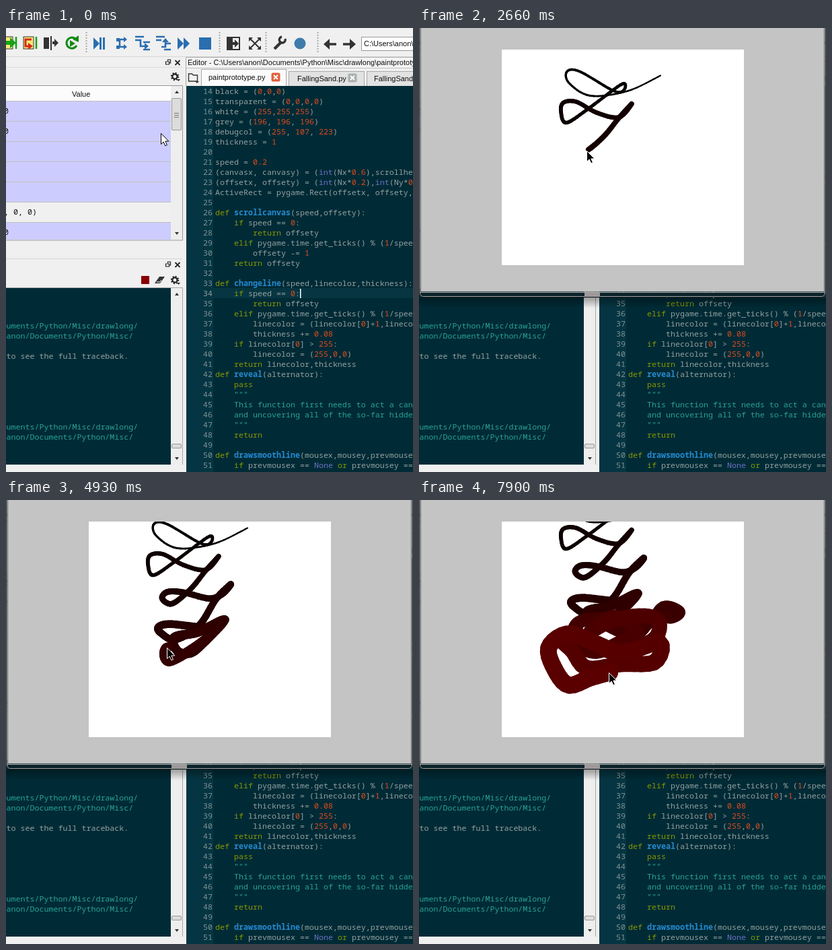
Animation of 605x659 px, one loop 7.99 s. Source, as an HTML page with a canvas:

```html
<!DOCTYPE html>
<html lang="en">
<head>
<meta charset="utf-8">
<title>Scrolling paint prototype</title>
<style>
  html, body { margin: 0; width: 100%; height: 100%; overflow: hidden; background: #f0f0f0; }
  svg, canvas { position: absolute; left: 0; top: 0; display: block; }
  #canvas { left: 123px; top: 32px; }
  text { white-space: pre; font: 11px "Liberation Sans", Arial, sans-serif; fill: #111; }
  .mono { font: 11.667px "Noto Sans Mono", monospace; }
  .plain { fill: #93a1a1; }
  .keyword { fill: #859900; }
  .number { fill: #dc4b20; }
  .builtin { fill: #6c71c4; }
  .doc { fill: #2aa198; }
  .name { fill: #268bd2; font-weight: bold; }
</style>
</head>
<body>
<svg id="scene" width="605" height="659"></svg>
<canvas id="canvas" width="360" height="320"></canvas>
<svg id="pointer" width="605" height="659">
  <path id="arrow" d="M.5 .5V16.5L4.2 13 6.8 18.8 9.4 17.7 6.9 12H11.8Z"/>
</svg>
<script>
const LOOP = 7990;
const OPEN = 330, READY = 530, START = 850;
const SCROLL = 0.013;            // canvas pixels per ms
const FIRST_LINE = 14, ROW = 15, CHAR = 7;

const code = `black = (0,0,0)
transparent = (0,0,0,0)
white = (255,255,255)
grey = (196, 196, 196)
debugcol = (255, 107, 223)
thickness = 1

speed = 0.2
(canvasx, canvasy) = (int(Nx*0.6),scrollhe
(offsetx, offsety) = (int(Nx*0.2),int(Ny*0
ActiveRect = pygame.Rect(offsetx, offsety,

def scrollcanvas(speed,offsety):
    if speed == 0:
        return offsety
    elif pygame.time.get_ticks() % (1/speed
        offsety -= 1
    return offsety

def changeline(speed,linecolor,thickness):
    if speed == 0:
        return offsety
    elif pygame.time.get_ticks() % (1/speed
        linecolor = (linecolor[0]+1,linecolor
        thickness += 0.08
    if linecolor[0] > 255:
        linecolor = (255,0,0)
    return linecolor,thickness
def reveal(alternator):
    pass
    """
    This function first needs to act a can
    and uncovering all of the so-far hidde
    """
    return

def drawsmoothline(mousex,mousey,prevmouse
    if prevmousex == None or prevmousey ==`.split("\n");

// ---------- still picture ----------
const rect = (x, y, w, h, fill, more = "") =>
  `<rect x="${x}" y="${y}" width="${w}" height="${h}" fill="${fill}" ${more}/>`;
const text = (x, y, body, more = "") => `<text x="${x}" y="${y}" ${more}>${body}</text>`;
const fill = (d, color) => `<path d="${d}" fill="${color}"/>`;
const line = (d, color, width = 1) =>
  `<path d="${d}" fill="none" stroke="${color}" stroke-width="${width}"/>`;
const escape = s => s.replace(/&/g, "&amp;").replace(/</g, "&lt;").replace(/>/g, "&gt;");

function highlight(source) {
  const token = /((?<=def )\w+)|(\b(?:def|if|elif|return|pass|or)\b)|(\b(?:int|None)\b)|(\b\d[\d.]*\b)/g;
  const kinds = ["name", "keyword", "builtin", "number"];
  let out = "", last = 0;
  for (const m of source.matchAll(token)) {
    const kind = kinds[m.slice(1).findIndex(Boolean)];
    out += escape(source.slice(last, m.index)) + `<tspan class="${kind}">${m[0]}</tspan>`;
    last = m.index + m[0].length;
  }
  return out + escape(source.slice(last));
}

const gear = (x, y) =>
  `<circle cx="${x}" cy="${y}" r="3.6" fill="none" stroke="#222" stroke-width="2.2"/>` +
  `<circle cx="${x}" cy="${y}" r="5.2" fill="none" stroke="#222" stroke-width="2" stroke-dasharray="2 2.08"/>` +
  fill(`M${x + 3} ${y + 4}h5l-2.5 3z`, "#222");
const dockButtons = y =>
  line(`M238.5 ${y - 1}h4v4h-5v-4zM240.5 ${y - 2}v-2h4v5h-2`, "#222", 1.2) +
  line(`M251.5 ${y - 3}l7 7m0-7l-7 7`, "#222", 1.8);
const scrollbar = (top, bottom, thumb, size) =>
  rect(245, top, 17, bottom - top, "#eeeeee") +
  fill(`M251 ${top + 11}l3-4 3 4z`, "#333") + fill(`M251 ${bottom - 11}l3 4 3-4z`, "#333") +
  rect(246.5, thumb, 14, size, "#dcdcdc", 'stroke="#999" rx="1.5"');
const closeMark = (x, y, color) =>
  rect(x - 6.5, y - 6.5, 13, 13, color, 'rx="2.5"') +
  line(`M${x - 3} ${y - 3}l6 6m0-6l-6 6`, "#fff", 2);

function toolbar() {
  const blue = "#2a6eb0", ink = "#333";
  let out = rect(0, 0, 605, 43, "#f0f0f0") + line("M0 42.5H605", "#d8d8d8");
  for (const x of [119, 317, 386, 463])
    out += `<path d="M${x}.5 6V38" stroke="#aaa" stroke-width="2" stroke-dasharray="2 2"/>`;
  out += rect(-8, 13, 18, 18, "#f5e878", 'stroke="#333"') + fill("M0 19h6v-5l9 8-9 8v-5h-6z", "#18a018") + line("M15 13v18", "#18a018", 2.5);
  out += rect(26, 13, 15, 18, "#f5e878", 'stroke="#333"') + line("M38 17h-9v10h5", "#d82a1a", 3) + fill("M33 22l7 5-7 5z", "#d82a1a") + line("M45 13v18", "#18a018", 2.5);
  out += rect(56, 14, 8, 17, ink) + line("M67 12v21", ink, 2) + fill("M69 20h3v-4l6 6-6 6v-4h-3z", ink);
  out += line("M103 16a8 8 0 1 0 2 10", "#128a12", 3.2) + fill("M99 17l9-6v10zM95 18l8 5-8 5z", "#128a12");
  out += fill("M130 14l9 9-9 9zM139 14h3v18h-3zM144 14h3v18h-3z", blue);
  out += line("M179 17h-10v11h8", blue, 2.5) + fill("M164 15h5v5h-5zM164 26h5v5h-5zM175 24l5 4-5 4zM175 13l5 4-5 4z", blue);
  out += line("M192 13h13M192 18h8v9h8M204 21h10M204 32h10", blue, 2.6) + fill("M206 22l6 5-6 5z", blue);
  out += line("M223 13h13M223 18h8M231 28h6v-9M235 32h10M236 23h9", blue, 2.6) + fill("M232 21l5-6 5 6z", blue);
  out += fill("M255 14l9 9-9 9zM264 14l9 9-9 9z", blue) + rect(287, 14, 18, 18, blue);
  out += line("M329 14h18v18h-18z", ink, 2) + rect(329, 14, 8, 18, ink) + fill("M335 21h5v-4l6 6-6 6v-4h-5z", ink);
  out += line("M363 16l14 14m0-14l-14 14", ink, 2) + fill("M361 14h6l-6 6zM379 14v6l-6-6zM361 32v-6l6 6zM379 32h-6l6-6z", ink);
  out += line("M399 31l10-10", ink, 4.5) + line("M415 16a4.5 4.5 0 1 1-5-3", ink, 3.4);
  out += `<circle cx="437" cy="23" r="8.5" fill="#3f7cac"/>`;
  out += line("M475 24h16", ink, 3.5) + fill("M472 24l9-8v16z", ink) + line("M501 24h16", ink, 3.5) + fill("M520 24l-9-8v16z", ink);
  return out + rect(528.5, 13.5, 90, 20, "#fff", 'stroke="#999"') + text(532, 27, "C:\\Users\\anon\\Documents");
}

function variablePane() {
  let out = rect(0, 43, 268, 616, "#f0f0f0") + dockButtons(51) + gear(251, 72) +
    line("M0 58.5H262", "#dcdcdc") + rect(0, 85, 262, 230, "#f6f6f6") + rect(0, 86, 245, 22, "#fcfcfc");
  for (let i = 0; i < 7; i++) {
    const y = 109 + i * 30;
    out += rect(0, y, 245, Math.min(30, 314 - y), i === 5 ? "#f0f0f0" : "#ccccff") + line(`M0 ${y - .5}H245`, "#c0c0c0");
    if ([0, 1, 6].includes(i)) out += text(-3, y + 18, "0", 'class="mono"');
  }
  return out + text(98, 102, "Value") + text(-3, 277, ", 0, 0)", 'class="mono"') +
    scrollbar(86, 314, 104.5, 47) + line("M250 126.500h7M250 129.500h7M250 132.500h7", "#777") +
    line("M0 85.500H262.500V315H0", "#999");
}

function consolePane() {
  const say = (y, body, kind) => text(0.5, y, body, `class="mono ${kind}"`);
  let out = line("M0 342.500H262", "#d4d4d4") + dockButtons(351) + rect(201, 368, 12, 12, "#8b0000") +
    fill("M221 379l7-10h8l-7 10z", "#333") + line("M224 377h5l2-3", "#fff") + gear(251, 374) +
    rect(0, 386, 245, 262, "#002b36") + scrollbar(386, 648, 617.5, 6) + line("M262.500 648V385.500H0", "#a8a8a8");
  for (const y of [446, 596])
    out += say(y, "uments/Python/Misc/drawlong/", "doc") + say(y + ROW, "anon/Documents/Python/Misc/", "doc");
  return out + say(491, "to see the full traceback.", "plain");
}

function editorPane() {
  let out = rect(263, 43, 342, 43, "#f0f0f0") + rect(267, 43, 338, 16, "#f4f4f4") + line("M267.500 86V43.500H605", "#aaa") +
    text(270, 55, "Editor - C:\\Users\\anon\\Documents\\Python\\Misc\\drawlong\\paintprototype.py") +
    line("M267 59.500H605", "#c0c0c0") +
    line("M271.500 79v-11h5l2 2h6v9z", "#333", 1.4) + fill("M281 79h6l-3 3z", "#333") +
    rect(420.5, 64.5, 112, 24, "#e2e2e2", 'stroke="#aaa"') + rect(536.5, 64.5, 100, 24, "#e2e2e2", 'stroke="#aaa"') +
    rect(290.5, 61.5, 126, 28, "#fbfbfb", 'stroke="#aaa"') +
    text(301, 77, "paintprototype.py") + text(433, 79, "FallingSand.py") + text(547, 79, "FallingSand_2.py") +
    closeMark(401, 73, "#e0603c") + closeMark(515, 74, "#a9b0b0") +
    rect(268, 86, 337, 573, "#002b36") + rect(268, 86, 40, 573, "#053542") + rect(308, 386, 297, 15, "#073642");
  code.forEach((source, i) => {
    const n = FIRST_LINE + i, y = 98 + i * ROW;
    const body = source.trimStart(), x = 311 + (source.length - body.length) * CHAR;
    const doc = n >= 44 && n <= 47;
    out += text(293, y, n, `class="mono plain" ${n === 34 ? 'font-weight="bold"' : 'opacity=".85"'}`) +
      text(x, y, doc ? body : highlight(body), `class="mono ${doc ? "doc" : "plain"}"`);
  });
  return out + rect(437, 387, 1.5, 14, "#fff");
}

const paintWindow = `<defs><linearGradient id="shade" x2="0" y2="1">
    <stop stop-color="#000" stop-opacity=".35"/><stop offset="1" stop-color="#000" stop-opacity="0"/>
  </linearGradient></defs><g id="window">` +
  rect(-20, 400, 645, 16, "url(#shade)") +
  rect(.5, -20, 604, 419.5, "rgba(60,65,70,.4)", 'rx="6" stroke="#111"') +
  rect(2, 392, 601, 7, "#0c2229") +
  rect(246, 393, 23, 5, "#c4b4b4", 'opacity=".8"') +
  rect(1.5, -20, 602, 418.500, "none", 'rx="5" stroke="#c8d0d2" stroke-opacity=".75"') +
  rect(2.5, -20, 600, 412, "none", 'stroke="#555"') +
  line("M2 392.500H603", "#a6b4b4") +
  rect(3, -20, 599, 411, "#fcfcff", 'id="client"') + "</g>";

document.getElementById("scene").innerHTML =
  toolbar() + variablePane() + consolePane() + editorPane() + paintWindow;

// ---------- pen path ----------
// Each stretch runs to time `end`; its points are evenly timed, as seen at that moment.
const stretches = [
  { end: 2660, points: [310,94, 255,101, 223,82, 220,65, 239,65, 290,94, 305,92, 301,84, 252,120,
    219,141, 211,124, 215,111, 234,110, 264,126, 297,133, 316,113, 297,134, 275,161, 250,182] },
  { end: 4090, points: [238,163, 232,155, 241,147, 264,148, 302,157, 322,150, 334,136, 312,158, 287,197,
    252,218, 230,208, 227,199, 246,195, 300,200, 325,188, 316,200, 295,222, 275,238] },
  { end: 4930, points: [255,224, 250,204, 285,196, 323,179, 290,212, 243,239, 240,219] },
  { end: 6660, points: [285,198, 335,203, 363,175, 387,182, 376,191, 350,191, 324,216, 302,213, 270,193,
    330,192, 250,194, 230,210, 238,232, 264,242, 300,227, 325,214, 290,190, 255,212] },
  { end: 7900, points: [290,178, 335,172, 357,182, 348,208, 300,224, 262,212, 232,201, 212,207, 228,224,
    250,250, 300,244, 350,241, 357,212, 300,228, 258,211, 220,199, 193,219, 201,250, 222,275, 255,264, 283,256] }
];
const knots = [{ t: START, x: 359, y: 71 + SCROLL * 2660 }];
let begin = START;
for (const { end, points } of stretches) {
  const count = points.length / 2;
  for (let i = 0; i < count; i++)
    knots.push({ t: begin + (end - begin) * (i + 1) / count, x: points[2 * i], y: points[2 * i + 1] + SCROLL * end });
  begin = end;
}

const spline = (a, b, c, d, u) =>
  b + u * ((c - a) + u * ((2 * a - 5 * b + 4 * c - d) + u * (3 * (b - c) + d - a))) / 2;

function penAt(t) {
  const last = knots.length - 1;
  const i = knots.findIndex(k => k.t > t) - 1;
  if (i < 0) return t < START ? knots[0] : knots[last];
  const [a, b, c, d] = [i - 1, i, i + 1, i + 2].map(n => knots[Math.max(0, Math.min(last, n))]);
  const u = (t - b.t) / (c.t - b.t);
  return { x: spline(a.x, b.x, c.x, d.x, u), y: spline(a.y, b.y, c.y, d.y, u) };
}

const STEP = 12;
const trail = [];
for (let t = START; t <= LOOP; t += STEP) trail.push({ t, ...penAt(t) });

// ---------- playback ----------
const find = id => document.getElementById(id);
const canvas = find("canvas"), win = find("window"), client = find("client"), arrow = find("arrow");
const ctx = canvas.getContext("2d");
const mix = (a, b, p) => a + (b - a) * p;

function drawTrail(time) {
  ctx.setTransform(1, 0, 0, 1, 0, 0);
  ctx.fillStyle = "#fff";
  ctx.fillRect(0, 0, 360, 320);
  ctx.translate(-123, -32 - Math.round(SCROLL * time));
  ctx.lineCap = "round";
  for (let i = 1; i < trail.length && trail[i].t <= time; i++) {
    const from = trail[i - 1], to = trail[i], age = to.t - START;
    ctx.strokeStyle = `rgb(${Math.floor(age * SCROLL)},0,0)`;
    ctx.lineWidth = 2.2 + age * 0.0033;
    ctx.beginPath();
    ctx.moveTo(from.x, from.y);
    ctx.lineTo(to.x, to.y);
    ctx.stroke();
  }
}

function pointerAt(time) {
  if (time < 90) return { x: 230, y: 156 };
  if (time < 440) {
    const p = (time - 90) / 350;
    return { x: mix(230, 244, p), y: mix(156, 241, p) };
  }
  const startY = knots[0].y - SCROLL * START;
  if (time < START) {
    const p = (time - 440) / (START - 440);
    return { x: mix(244, 359, p), y: mix(241, startY, p) };
  }
  const pen = penAt(time);
  return { x: pen.x - 1, y: pen.y - SCROLL * time };
}

function render(time) {
  const p = Math.max(0, Math.min(1, (time - OPEN) / 120));
  const scale = 0.8 + 0.2 * p;
  win.setAttribute("opacity", p);
  win.setAttribute("transform", `translate(303 156) scale(${scale}) translate(-303 -156)`);
  client.setAttribute("fill", time < READY ? "#fcfcff" : "#c4c4c4");
  canvas.style.visibility = time < READY ? "hidden" : "visible";
  if (time >= READY) drawTrail(time);

  const { x, y } = pointerAt(time), dark = time > OPEN;
  arrow.setAttribute("transform", `translate(${Math.round(x)} ${Math.round(y)})`);
  arrow.setAttribute("fill", dark ? "#000" : "#fff");
  arrow.setAttribute("stroke", dark ? "#fff" : "#000");
}

const origin = performance.now();
function tick() {
  render((performance.now() - origin) % LOOP);
  requestAnimationFrame(tick);
}
tick();
</script>
</body>
</html>
```
